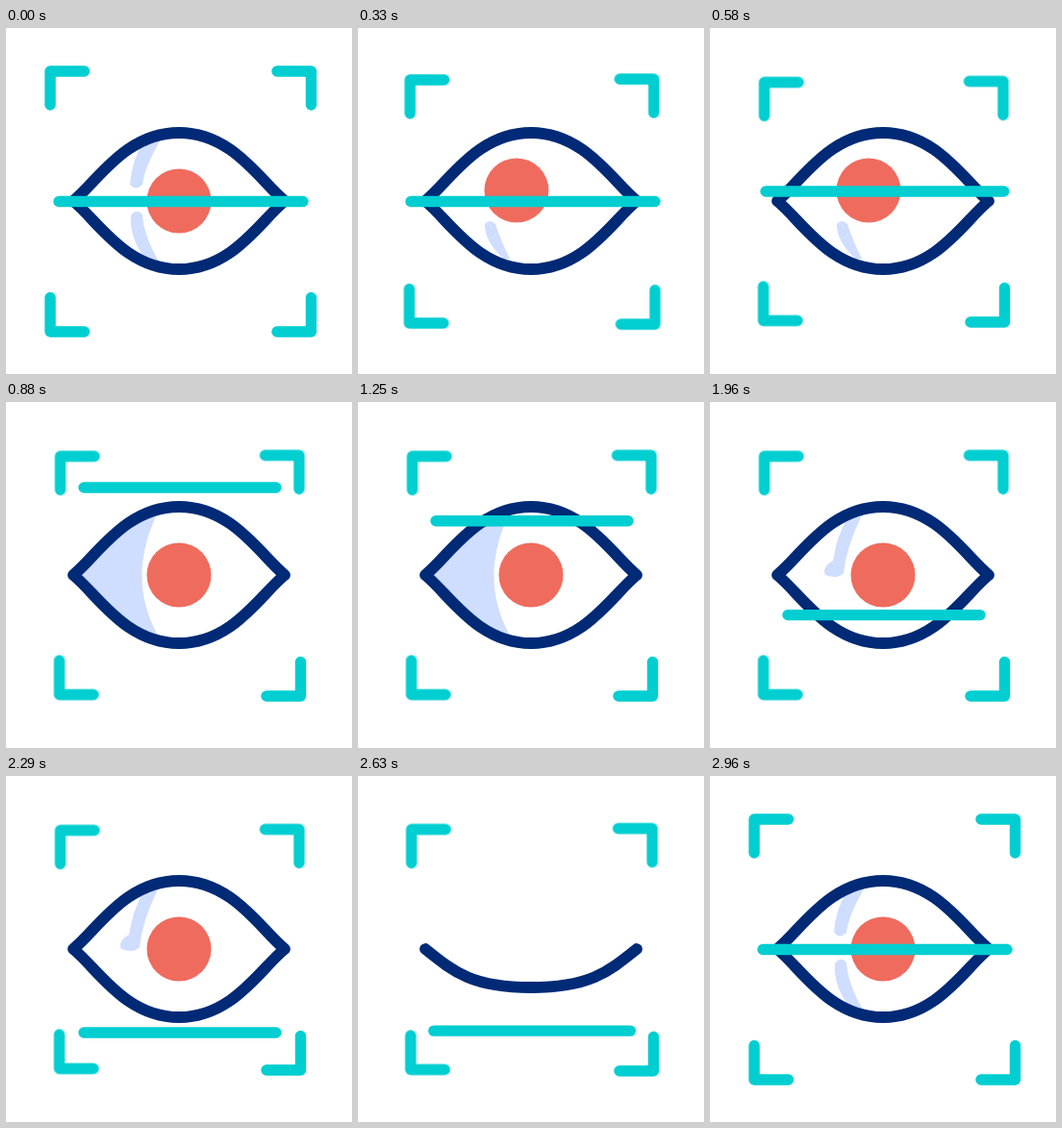
An HTML page without scripts for the animation above (3000 ms loop, 360 by 360 pixels).

```html
<!DOCTYPE html>
<html lang="en">
<head>
<meta charset="utf-8">
<title>Eye scan</title>
<style>
  html, body { margin: 0; width: 100%; height: 100%; overflow: hidden; background: #fff; }
  svg { display: block; width: 100%; height: 100%; }

  .eye, .iris, .shade, .bar, .corner {
    animation: 3s cubic-bezier(.35, 0, .65, 1) infinite;
  }
  .line { fill: none; stroke-linecap: round; stroke-linejoin: round; }
  .scan { stroke: #00ced1; stroke-width: 11.4; }
  .lid { stroke: #002a76; stroke-width: 11.8; }

  .eye { animation-name: blink; }
  .iris { animation-name: look; fill: #ef6b5d; }
  .shade { animation-name: shade; animation-timing-function: step-end; fill: #cfddff; }
  .bar { animation-name: sweep; }
  .corner { animation-name: squeeze; }

  @keyframes squeeze {
    0%, 98.3%, 100% { transform: none; }
    16%, 85.3% { transform: translate(var(--x), var(--y)); }
  }

  @keyframes look {
    0%, 28%, 100% { transform: none; }
    14%, 17% { transform: translate(-17px, -12.5px); }
  }

  @keyframes sweep {
    0%, 16.7%, 98.3%, 100% { d: path("M55 180.5H309"); }
    29.1% { d: path("M81 89H281"); }
    33.3% { d: path("M81 89H281"); animation-timing-function: linear; }
    77.8%, 85.3% { d: path("M81 273H281"); }
  }

  @keyframes blink {
    0%, 77%, 97.5%, 100% {
      d: path("M70 180C95 160 124 109 180 109S265 160 290 180C265 200 236 251 180 251S95 200 70 180Z");
    }
    86%, 88.5% {
      d: path("M70 180C101 205 120 220 180 220S259 205 290 180C259 205 240 220 180 220S101 205 70 180Z");
    }
  }

  /* the shadow is wiped away differently in each phase of the scan */
  @keyframes shade {
    0%, 92%, 100% {
      d: path("M144 116H161Q144 145 142 163Q135 170 129 163Q130 140 144 116ZM130 195Q136 187 142 194Q143 215 159 243L145 241Q128 217 130 195Z");
    }
    6% { d: path("M132 204Q137 198 143 204Q146 214 154 232L158 240L152 241Q131 221 132 204Z"); }
    23% { d: path("M60 100H166Q119 180 162 250H60Z"); }
    42% {
      d: path("M142 122L159 118Q145 145 142 163Q130 162 127 154Q127 143 142 122ZM142 204Q150 225 159 243L151 240Q142 220 142 204Z");
    }
    59% { d: path("M142 122L158 118Q142 150 139 178Q133 185 120 180Q116 172 128 165Q132 140 142 122Z"); }
    77% { d: path("M0 0Z"); }
  }
</style>
</head>
<body>
<svg viewBox="0 0 360 360">
  <clipPath id="opening">
    <path class="eye" d="M70 180C95 160 124 109 180 109S265 160 290 180C265 200 236 251 180 251S95 200 70 180Z"/>
  </clipPath>

  <g clip-path="url(#opening)">
    <path class="shade" d="M0 0Z"/>
    <circle class="iris" cx="180" cy="180" r="33.5"/>
  </g>
  <path class="line lid eye" d="M70 180C95 160 124 109 180 109S265 160 290 180C265 200 236 251 180 251S95 200 70 180Z"/>

  <g class="line scan">
    <path class="corner" style="--x:10.5px;--y:11.5px" d="M46 80V45H81.5"/>
    <path class="corner" style="--x:-12.5px;--y:10.5px" d="M282 45H317.5V80"/>
    <path class="corner" style="--x:9.5px;--y:-11.5px" d="M46 280.5V316H81.5"/>
    <path class="corner" style="--x:-11px;--y:-10px" d="M317.5 280.5V316H282"/>
    <path class="bar" d="M55 180.5H309"/>
  </g>
</svg>
</body>
</html>
```
